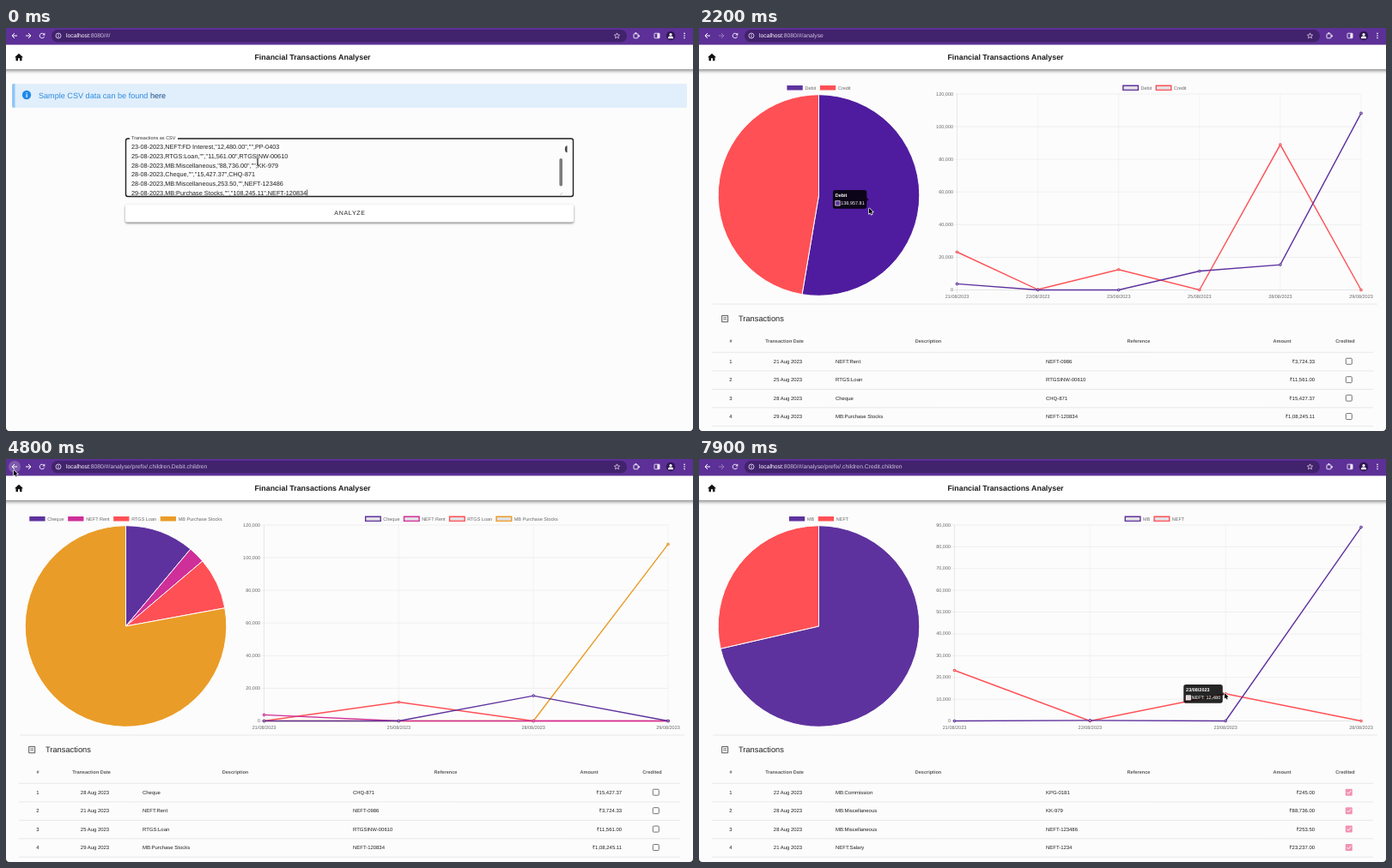
Recreate the animation shown at these times as an HTML page with a canvas. Size 800x470 px, loop 8 s.

```html
<!DOCTYPE html>
<html lang="en">
<head>
<meta charset="utf-8">
<title>Financial Transactions Analyser</title>
<style>
html, body { margin: 0; width: 100%; height: 100%; overflow: hidden; background: #fcfcfc; }
canvas { display: block; }
</style>
</head>
<body>
<canvas id="stage" width="800" height="470"></canvas>
<script>
const ctx = document.getElementById('stage').getContext('2d');
const LOOP = 8000, STEP = 100;
const PURPLE = '#5e329e', RED = '#ff5055', MAGENTA = '#cf2f98', ORANGE = '#ea9c28';
const HOVER = { [PURPLE]: '#501c9f', [RED]: '#ff3037', [ORANGE]: '#e99720' };

const rent = ['21', 'NEFT:Rent', 'NEFT-0986', '3,724.33'];
const loan = ['25', 'RTGS:Loan', 'RTGSINW-00610', '11,561.00'];
const cheque = ['28', 'Cheque', 'CHQ-871', '15,427.37'];
const stocks = ['29', 'MB:Purchase Stocks', 'NEFT-120834', '1,08,245.11'];

const overview = {
  url: '/analyse', max: 120000, tick: 20000, left: 300.5, days: [21, 22, 23, 25, 28, 29],
  series: [
    ['Debit', PURPLE, [3724.33, 0, 0, 11561, 15427.37, 108245.11]],
    ['Credit', RED, [23237, 245, 12480, 0, 88989.5, 0]]],
  rows: [rent, loan, cheque, stocks]
};
const debit = {
  url: '/analyse/prefix/.children.Debit.children', max: 120000, tick: 20000, left: 300.5, days: [21, 25, 28, 29],
  series: [
    ['Cheque', PURPLE, [0, 0, 15427.37, 0]],
    ['NEFT Rent', MAGENTA, [3724.33, 0, 0, 0]],
    ['RTGS Loan', RED, [0, 11561, 0, 0]],
    ['MB Purchase Stocks', ORANGE, [0, 0, 0, 108245.11]]],
  rows: [cheque, rent, loan, stocks]
};
const credit = {
  url: '/analyse/prefix/.children.Credit.children', max: 90000, tick: 10000, left: 297.5, days: [21, 22, 23, 28],
  series: [
    ['MB', PURPLE, [0, 245, 0, 88989.5]],
    ['NEFT', RED, [23237, 0, 12480, 0]]],
  rows: [
    ['22', 'MB:Commission', 'KPG-0181', '245.00'],
    ['28', 'MB:Miscellaneous', 'KK-979', '88,736.00'],
    ['28', 'MB:Miscellaneous', 'NEFT-123486', '253.50'],
    ['21', 'NEFT:Salary', 'NEFT-1234', '23,237.00']],
  checked: true
};
const form = { url: '/', series: [] };
const scenes = [[0, form], [600, overview], [2300, debit], [4900, overview], [5500, credit]];

const csv = [
  '23-08-2023,NEFT:FD Interest,"12,480.00","",PP-0403',
  '25-08-2023,RTGS:Loan,"","11,561.00",RTGSINW-00610',
  '28-08-2023,MB:Miscellaneous,"88,736.00","",KK-979',
  '28-08-2023,Cheque,"","15,427.37",CHQ-871',
  '28-08-2023,MB:Miscellaneous,253.50,"",NEFT-123486',
  '29-08-2023,MB:Purchase Stocks,"","108,245.11",NEFT-120834'];

// time, x, y
const pointerPath = [
  [0, 293, 153], [100, 293, 153], [400, 396, 214], [700, 396, 214], [1400, 198, 210], [2300, 198, 210],
  [3100, 169, 139], [3500, 169, 139], [3900, 94, 92], [4500, 9, 13], [4900, 9, 13],
  [5300, 98, 195], [6200, 98, 195], [6500, 290, 232], [6800, 290, 232], [7700, 612, 273], [8000, 612, 273]];

const tooltips = [
  { from: 1200, to: 2300, path: [[0, 197.5, 200]], text: ['Debit', '138,957.81'], arc: 0 },
  { from: 2400, to: 2900, path: [[0, 102, 240]], left: true, text: ['MB Purchase Stocks', '108,245.11'], arc: 3 },
  { from: 3000, to: 4100, path: [[3100, 186.5, 163], [3500, 174.5, 153.5]], text: ['Cheque', '15,427.37'], arc: 0 },
  { from: 5200, to: 5500, path: [[0, 81, 190]], left: true, text: ['Credit', '124,951.5'], arc: 1 },
  { from: 5500, to: 6300, path: [[5500, 79, 191], [6000, 94, 158.5]], left: true, text: ['NEFT', '35,717'], arc: 1 },
  { from: 7700, to: 8000, path: [[0, 612, 274]], text: ['23/08/2023', 'NEFT: 12,480'], color: '#e5cfd0' }];

function along(path, t) {
  let i = path.findIndex(p => p[0] > t);
  if (i < 0) i = path.length;
  const a = path[Math.max(i - 1, 0)], b = path[Math.min(i, path.length - 1)];
  const k = b[0] > a[0] ? (t - a[0]) / (b[0] - a[0]) : 0;
  return [a[1] + (b[1] - a[1]) * k, a[2] + (b[2] - a[2]) * k];
}

const sum = list => list.reduce((a, b) => a + b, 0);
const easeOutQuart = k => 1 - (1 - Math.min(k, 1)) ** 4;

function shares(view) {
  const totals = view.series.map(s => sum(s[2]));
  return totals.map(v => v / sum(totals));
}

function setFont(size, weight = 400) {
  ctx.font = `${weight} ${size}px "Liberation Sans", Arial, sans-serif`;
}
function text(str, x, y, size, color, align = 'left', weight = 400) {
  setFont(size, weight);
  ctx.fillStyle = color;
  ctx.textAlign = align;
  ctx.fillText(str, x, y);
}
function rect(x, y, w, h, color, r = 0) {
  ctx.fillStyle = color;
  ctx.beginPath();
  ctx.roundRect(x, y, w, h, r);
  ctx.fill();
}
function outline(x, y, w, h, color, width, r = 0) {
  ctx.strokeStyle = color;
  ctx.lineWidth = width;
  ctx.beginPath();
  ctx.roundRect(x, y, w, h, r);
  ctx.stroke();
}
function line(points, color, width) {
  ctx.strokeStyle = color;
  ctx.lineWidth = width;
  ctx.beginPath();
  points.forEach(p => ctx.lineTo(...p));
  ctx.stroke();
}
function poly(points, color) {
  ctx.fillStyle = color;
  ctx.beginPath();
  points.forEach(p => ctx.lineTo(...p));
  ctx.fill();
}
function disc(x, y, r, color) {
  rect(x - r, y - r, 2 * r, 2 * r, color, r);
}
function shadowed(blur, dy, alpha, paint) {
  ctx.save();
  ctx.shadowColor = `rgba(0,0,0,${alpha})`;
  ctx.shadowBlur = blur;
  ctx.shadowOffsetY = dy;
  paint();
  ctx.restore();
}

function arrow(x, dir, color) {
  line([[x - 3 * dir, 9], [x + 3 * dir, 9]], color, 1);
  line([[x, 6], [x + 3 * dir, 9], [x, 12]], color, 1);
}

function drawBrowser(view, t) {
  const icon = '#eee6f6';
  rect(0, 0, 800, 19.5, '#5c3096');
  rect(53, 2, 670, 14.5, '#41226c', 7.2);
  if (t >= 4400 && t < 5000) disc(10, 9, 7, '#7d5bab');
  arrow(10, -1, '#fff');
  arrow(26, 1, view === form || t >= 4700 && t < 5500 ? '#fff' : '#9a7dbd');
  ctx.strokeStyle = icon;
  ctx.lineWidth = 1;
  ctx.beginPath();
  ctx.arc(42, 9, 2.8, 0.3, 5.6);
  ctx.stroke();
  poly([[45.3, 5.6], [45.3, 8.6], [42.3, 8.6]], icon);
  outline(58, 6, 6, 6, icon, 0.8, 3);
  line([[61, 8.6], [61, 10.8]], icon, 0.9);
  line([[61, 7.1], [61, 8]], icon, 0.9);
  text('localhost', 70, 9.2, 6.8, '#fff');
  const hostWidth = ctx.measureText('localhost').width;
  text(':8080/#' + view.url, 70 + hostWidth, 9.2, 6.8, '#cfc3de');

  const star = Array.from({ length: 11 }, (_, i) => {
    const r = i % 2 ? 1.5 : 3.3, a = i * Math.PI / 5;
    return [711.5 + r * Math.sin(a), 9.2 - r * Math.cos(a)];
  });
  line(star, icon, 0.7);
  outline(731, 6.8, 5, 5, icon, 1, 0.6);
  disc(733.4, 6, 1.1, icon);
  disc(737, 9.3, 1.1, icon);
  outline(755, 6.2, 6, 5.6, icon, 0.9, 0.6);
  rect(758.3, 6.2, 2.8, 5.6, icon);
  disc(774, 9, 5.2, '#2d1650');
  disc(774, 7.5, 1.6, '#fff');
  rect(771, 9.6, 6, 2.6, '#fff', [2, 2, 0, 0]);
  for (const y of [6.4, 9, 11.6]) disc(790, y, 0.8, '#fff');
}

function drawAppBar() {
  shadowed(4, 1.5, 0.45, () => rect(-5, 19.5, 810, 28.5, '#fff'));
  poly([[15, 29.7], [20, 34.2], [18.5, 34.2], [18.5, 38.2], [16, 38.2], [16, 35.2], [14, 35.2],
    [14, 38.2], [11.5, 38.2], [11.5, 34.2], [10, 34.2]], '#111');
  text('Financial Transactions Analyser', 357, 34.2, 8.87, '#1c1c1c', 'center', 700);
}

function badge(x, y, r, color, glyph, glyphColor) {
  disc(x, y, r, color);
  text(glyph, x, y + 0.3, 8, glyphColor, 'center', 700);
}

function drawForm() {
  rect(7, 65, 786, 28, '#e1eefb', 2);
  rect(7, 65, 3.5, 28, '#8fc7f8', [2, 0, 0, 2]);
  badge(24, 78, 5.2, '#2089e8', 'i', '#fff');
  const hint = 'Sample CSV data can be found ';
  text(hint, 38, 79, 9.1, '#2b8be0');
  text('here', 38 + ctx.measureText(hint).width, 79, 9.1, '#164a86');

  outline(139.5, 129, 521, 67.5, '#222', 1.4, 2.5);
  rect(144, 127, 56, 4, '#fcfcfc');
  text('Transactions as CSV', 146, 128.7, 5.5, '#333');
  ctx.save();
  ctx.beginPath();
  ctx.rect(141, 133, 518, 62.5);
  ctx.clip();
  csv.forEach((row, i) => text(row, 146, 139.3 + i * 10.7, 7.27, '#222'));
  const end = 146 + ctx.measureText(csv[5]).width;
  line([[end + 0.6, 188.5], [end + 0.6, 196]], '#111', 0.7);
  ctx.restore();
  rect(644.4, 152, 3.6, 32.5, '#7c7c7c', 1.8);
  ctx.fillStyle = '#444';
  ctx.beginPath();
  ctx.ellipse(653.5, 141.3, 2.6, 4, 0, Math.PI / 2, Math.PI * 1.5);
  ctx.fill();
  line([[645, 195], [648, 192]], '#999', 0.5);

  shadowed(2.5, 1.2, 0.5, () => rect(139, 206, 522, 20.5, '#fff', 2));
  ctx.letterSpacing = '0.7px';
  text('ANALYZE', 400.5, 216.5, 7, '#222', 'center');
  ctx.letterSpacing = '0px';
}

function drawLegend(view, center, boxed) {
  setFont(5.5);
  const widths = view.series.map(s => 21 + ctx.measureText(s[0]).width);
  let x = center - (sum(widths) + 4.6 * (widths.length - 1)) / 2;
  view.series.forEach(([name, color], i) => {
    rect(x, 67, 18.3, 5.5, boxed ? '#e2dfe3' : color);
    if (boxed) outline(x + 0.4, 67.2, 17.6, 5.2, color, 1.4);
    text(name, x + 21, 70, 5.5, '#666');
    x += widths[i] + 4.6;
  });
}

function drawPie(view, previous, p, hovered) {
  const now = shares(view), before = shares(previous);
  const count = Math.max(now.length, before.length);
  let angle = -Math.PI / 2;
  for (let i = 0; i < count; i++) {
    const a = before[i] || 0, b = now[i] || 0;
    const end = angle + (a + (b - a) * p) * 2 * Math.PI;
    if (end - angle < 0.002) continue;
    const color = (view.series[i] || previous.series[i])[1];
    ctx.fillStyle = i === hovered && HOVER[color] || color;
    ctx.strokeStyle = '#fff';
    ctx.lineWidth = 1;
    ctx.beginPath();
    ctx.moveTo(139.5, 195);
    ctx.arc(139.5, 195, 117.3, angle, end);
    ctx.closePath();
    ctx.fill();
    ctx.stroke();
    angle = end;
  }
}

function drawLineChart(view, p) {
  const right = 771, base = 305.5, height = 228.5;
  const gap = (right - view.left) / (view.days.length - 1);
  const grid = '#e6e6e6';
  for (let v = 0; v <= view.max; v += view.tick) {
    const y = base - v / view.max * height;
    line([[view.left - 3.5, y], [right, y]], v ? grid : '#d5d5d5', 0.6);
    text(v.toLocaleString('en-US'), view.left - 4.5, y, 5.5, '#666', 'right');
  }
  view.days.forEach((day, i) => {
    const x = view.left + i * gap;
    line([[x, base - height], [x, base + 3.5]], i ? '#ededed' : '#d8d8d8', 0.6);
    text(day + '/08/2023', x, 313.5, 5.5, '#666', 'center');
  });
  for (const [, color, values] of [...view.series].reverse()) {
    const points = values.map((v, i) => [view.left + i * gap, base - v * p / view.max * height]);
    line(points, color, 1.4);
    for (const [x, y] of points) {
      disc(x, y, 1.8, color);
      disc(x, y, 0.8, '#c9c4cc');
    }
  }
}

function drawTable(view) {
  const ink = '#222', head = '#5a5a5a', rule = '#e0e0e0';
  line([[16, 322], [790, 322]], rule, 0.7);
  outline(26.7, 335.4, 7, 7.4, '#444', 0.9);
  for (const y of [337.7, 339.6]) line([[28.3, y], [32.2, y]], '#444', 0.7);
  text('Transactions', 46, 339.5, 9.3, ink);
  const heads = [['#', 37], ['Transaction Date', 99.5], ['Description', 267], ['Reference', 512], ['Amount', 679], ['Credited', 752.5]];
  for (const [name, x] of heads) text(name, x, 365.3, 5.55, head, 'center', 700);
  line([[15, 378.3], [785, 378.3]], rule, 0.7);
  view.rows.forEach(([day, description, reference, amount], i) => {
    const y = 389.2 + i * 21.45;
    text(i + 1, 37, y, 5.95, ink, 'center');
    text(day + ' Aug 2023', 103.5, y, 5.95, ink, 'center');
    text(description, 159, y, 5.95, ink);
    text(reference, 404, y, 5.95, ink);
    text('₹' + amount, 717, y, 5.95, ink, 'right');
    if (view.checked) {
      rect(752.8, y - 4.5, 8, 8, '#f192b4', 1);
      line([[754.6, y - 0.6], [756.2, y + 1.2], [759.3, y - 2.2]], '#fff', 1);
    } else {
      outline(753.3, y - 4, 7, 7, '#666', 0.9, 1);
    }
    line([[15, y + 10.7], [785, y + 10.7]], rule, 0.7);
  });
}

function drawTooltip(tip, view, t) {
  const [x, y] = along(tip.path, t), [title, body] = tip.text;
  setFont(5.5, 700);
  const titleWidth = ctx.measureText(title).width + 5.5;
  setFont(5.5);
  const width = Math.max(titleWidth, ctx.measureText(body).width + 11.9);
  const left = tip.left ? x + 2.2 : x - 2.2 - width, edge = tip.left ? left : left + width;
  const black = 'rgba(0,0,0,.85)';
  rect(left, y - 11, width, 21.8, black, 2.7);
  poly([[edge, y - 2.2], [x, y], [edge, y + 2.2]], black);
  text(title, left + 2.8, y - 5, 5.5, '#fff', 'left', 700);
  rect(left + 2.6, y + 1.4, 6, 6, '#fff');
  rect(left + 3.3, y + 2.1, 4.6, 4.6, tip.color || view.series[tip.arc][1]);
  text(body, left + 9.3, y + 4.6, 5.5, '#fff');
}

function drawAlert() {
  shadowed(2, 0.5, 0.2, () => rect(270, 59, 260, 28.5, '#f57f06', 2));
  badge(284, 72.6, 5, '#fff', '!', '#f57f06');
  text('Drill down is not possible anymore', 297, 73.5, 9.15, '#fff');
  text('×', 515.5, 73.3, 7.5, '#fff', 'center');
}

function drawPointer(t) {
  const [x, y] = along(pointerPath, t);
  if (t < 200) {
    line([[x - 1.5, y - 1], [x, y], [x, y + 6.5], [x - 1.5, y + 7.5]], '#333', 0.8);
    line([[x + 1.5, y - 1], [x, y], [x, y + 6.5], [x + 1.5, y + 7.5]], '#333', 0.8);
    return;
  }
  const shape = [[0, 0], [0, 6.5], [1.5, 5.2], [2.6, 7.6], [3.7, 7.1], [2.7, 4.8], [4.6, 4.6], [0, 0]]
    .map(([dx, dy]) => [x + dx, y + dy]);
  line(shape, '#fff', 1.3);
  poly(shape, '#000');
}

function drawCorners() {
  ctx.fillStyle = '#222';
  ctx.beginPath();
  ctx.rect(0, 466, 800, 4);
  ctx.roundRect(0, 440, 800, 30, [0, 0, 4, 4]);
  ctx.fill('evenodd');
}

function drawDashboard(view, previous, start, t) {
  const p = easeOutQuart((t - start) / 1000);
  const tip = tooltips.find(k => t >= k.from && t < k.to);
  const alerting = t >= 3500 && t < 4500;
  ctx.save();
  if (alerting) ctx.translate(0, 32);
  drawLegend(view, 139.5, false);
  drawLegend(view, 530.5, true);
  drawPie(view, previous, p, tip && tip.arc);
  drawLineChart(view, p);
  drawTable(view);
  if (tip) drawTooltip(tip, view, t);
  ctx.restore();
  if (alerting) drawAlert();
}

function render(now) {
  const t = Math.floor(now % LOOP / STEP) * STEP;
  const index = scenes.findLastIndex(s => t >= s[0]);
  const [start, view] = scenes[index];
  ctx.textBaseline = 'middle';
  ctx.textRendering = 'geometricPrecision';
  rect(0, 0, 800, 470, '#fcfcfc');
  if (view === form) drawForm();
  else drawDashboard(view, scenes[index - 1][1], start, t);
  drawAppBar();
  drawBrowser(view, t);
  // The bottom rounding spares the area above it
  ctx.save();
  ctx.beginPath();
  ctx.rect(0, 466, 800, 4);
  ctx.clip();
  ctx.fillStyle = '#222';
  ctx.beginPath();
  ctx.rect(0, 440, 800, 30);
  ctx.roundRect(0, 440, 800, 30, [0, 0, 4, 4]);
  ctx.fill('evenodd');
  ctx.restore();
  drawPointer(t);
}

let origin;
function tick(now) {
  origin ??= now;
  render(now - origin);
  requestAnimationFrame(tick);
}
requestAnimationFrame(tick);
</script>
</body>
</html>
```
